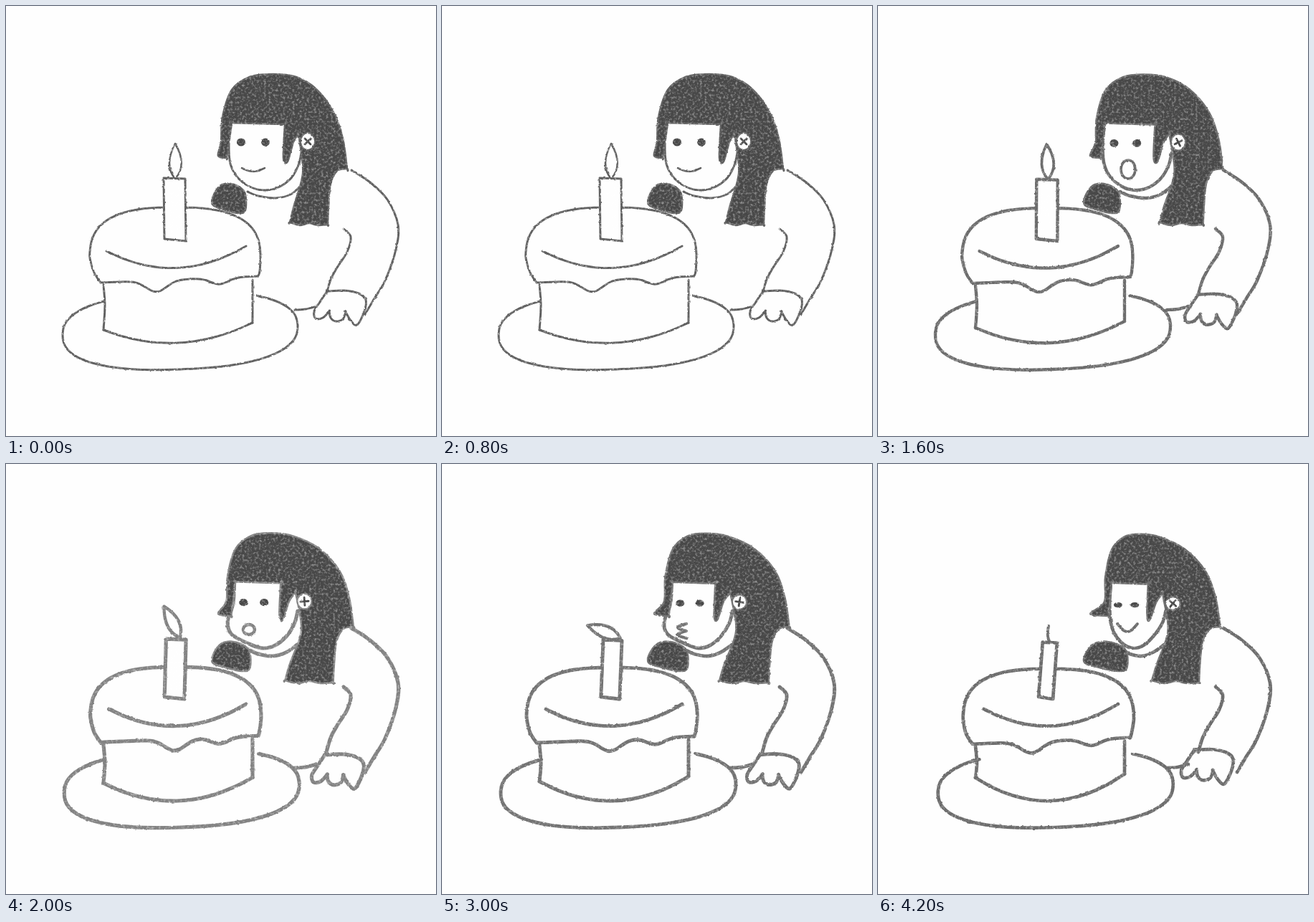
Write an HTML page that moves like this. It is 600 by 600 pixels and loops after 4600 ms.

```html
<!DOCTYPE html>
<html lang="en">
<head>
<meta charset="utf-8">
<title>Birthday candle</title>
<style>
html, body { margin: 0; width: 100%; height: 100%; overflow: hidden; background: #fefefe; }
svg { display: block; width: 100vw; height: 100vh; }
path { stroke-linecap: round; stroke-linejoin: round; }
</style>
</head>
<body>
<svg viewBox="0 0 600 600">
  <defs>
    <filter id="pencil" x="0" y="0" width="600" height="600" filterUnits="userSpaceOnUse" color-interpolation-filters="sRGB">
      <feTurbulence id="edge" type="fractalNoise" baseFrequency=".2" numOctaves="2" result="warp"/>
      <feDisplacementMap in="SourceGraphic" in2="warp" scale="2.4" xChannelSelector="R" yChannelSelector="G" result="rough"/>
      <feTurbulence id="grain" type="fractalNoise" baseFrequency=".3" numOctaves="3"/>
      <feColorMatrix values="0 0 0 0 0  0 0 0 0 0  0 0 0 0 0  1.1 0 0 0 .42" result="tooth"/>
      <feComposite in="rough" in2="tooth" operator="in"/>
    </filter>
  </defs>
  <g id="art" filter="url(#pencil)"></g>
</svg>
<script>
const paper = '#fefefe', dark = '#484848';
const { PI, sin, cos, abs, sign, min, max } = Math;
const mix = (a, b, t) => a + (b - a) * t;
const bump = (x, size) => Math.exp(-((x / size) ** 2));
const sample = (n, f) => Array.from({ length: n + 1 }, (_, i) => f(i / n));

// Key points of the figure looking straight; * marks a corner.
const figure = {
  hair: '296,209 300,190 302,155 315,117 340,99 372,95 405,99 433,116 457,148 470,185 476,227* 462,230 453,248 450,280 449,305* 435,306 423,303 410,306 396,302* 402,278 412,245 414,222 408,178* 401,190 393,217 387,212 389,165* 350,164 315,163* 312,185 308,212*',
  lock: '302,249 318,249 333,260 334,285 324,289 304,284 288,277 291,261',
  face: '313,168 311,195 313,220 322,238 340,252 360,257 380,253 398,240 408,222 412,205',
  neck: '337,259 352,265 376,268 397,263 410,252',
  arm: '482,229 508,246 532,270 547,305 544,340 529,383 514,408 501,430',
  sleeve: '471,311 481,322 476,343 462,365 453,382 447,402',
  waist: '403,424 418,423 433,419',
  hand: '446,402 470,401 490,405 500,414 498,430 488,449 479,443 472,431* 468,441 458,444 451,439 449,430* 440,439 430,440 428,430 436,417 446,402'
};

// Mouth shapes: each returns a list of points around x, y.
const smile = (x, y, w, h) => sample(6, t => [x + w * (2 * t - 1), y + h * sin(PI * t)]);
const ring = (x, y, w, h) => sample(12, t => [x + w * cos(2 * PI * t), y + h * sin(2 * PI * t)]);
const pucker = (x, y) => sample(16, t => [x + 5 - 12 * abs(sin(2 * PI * t)), y + 10 * (2 * t - 1)]);

// turn: how far the head has turned; lean: flame angle in degrees.
const ready = { turn: 0, width: 3, ink: '#606060', lean: 0, mouth: smile(345, 226, 16, 5) };
const gasp = { turn: .2, width: 4.4, ink: '#6b6b6b', lean: -2, mouth: ring(349, 228, 10, 13) };
const puff = { turn: .45, width: 5.2, ink: '#828282', lean: -27, pout: .9, mouth: ring(339, 231, 8, 7) };
const blow = { turn: .6, width: 4.9, ink: '#727272', lean: -69, pout: 1, mouth: pucker(336, 233) };
const done = { turn: .75, width: 4.9, ink: '#747474', rise: 0, mouth: ring(345, 233, 2, 1.5) };
const happy = { turn: .95, width: 4.7, ink: '#6c6c6c', mouth: smile(348, 223, 14, 11) };

const vary = (pose, parts) => ({ ...pose, wobble: 1, ...parts });
const drawings = {
  A: ready,
  B: vary(ready, { lean: 4 }),
  C: vary(ready, { lean: -4 }),
  D: vary(gasp, { mouth: ring(349, 228, 7, 9) }),
  M: gasp,
  E: puff,
  F: vary(puff, { lean: -36 }),
  G: blow,
  H: vary(blow, { lean: -62 }),
  I: vary(done, { rise: -70 }),
  J: done,
  K: vary(done, { rise: 20 }),
  Z: happy
};
const order = 'ABCBADADMDEFEGHGHGIJKZZ';
const step = 200, loop = order.length * step;

function random(seed) {
  return () => (seed = seed * 16807 % 2147483647) / 2147483647;
}

function points(text, move = (x, y) => [x, y]) {
  return text.split(' ').flatMap(s => {
    const p = move(...s.replace('*', '').split(',').map(Number));
    return s.endsWith('*') ? [p, p] : [p];
  });
}

function curve(pts, closed) {
  const n = pts.length;
  const at = i => closed ? pts[(i + n) % n] : pts[max(0, min(n - 1, i))];
  let d = 'M' + pts[0];
  for (let i = 0; i < (closed ? n : n - 1); i++) {
    const [a, b, c, e] = [at(i - 1), at(i), at(i + 1), at(i + 2)];
    const leave = b.map((v, k) => v + (c[k] - a[k]) / 6);
    const reach = c.map((v, k) => v - (e[k] - b[k]) / 6);
    d += `C${leave} ${reach} ${c}`;
  }
  return d + (closed ? 'Z' : '');
}

// Part of a rounded ellipse between two angles in degrees.
function oval(x, y, rx, ry, from, to, n, tilt = 0) {
  const round = v => sign(v) * abs(v) ** (2 / n);
  return sample(28, t => {
    const a = mix(from, to, t) * PI / 180, dx = round(cos(a));
    return [x + rx * dx, y + ry * round(sin(a)) - tilt * dx];
  });
}

const sag = (x0, y0, x1, y1, depth) =>
  sample(8, t => [mix(x0, x1, t), mix(y0, y1, t) + depth * 4 * t * (1 - t)]);

function cake(u, sway) {
  const low = 5 * u, left = 452 - 15 * u, right = 442 - 10 * u;
  const drip = 210 + 26 * sway;
  const frosting = sample(24, t => {
    const x = mix(132, 352, t);
    return [x, mix(386, 377, t) + low + 16 * bump(x - drip, 20) + 9 * bump(x - 298, 17)];
  });
  const top = oval(236 + 2 * u, 352 + low, 119, 71, 180, 360, 2.7);
  return [
    oval(243 + 5 * u, 453, 164, 54, 233, -53, 2.4, 6),
    [[136, 389 + low], [138, 418], [136, left]],
    sag(136, left, 344, right, 470 - (left + right) / 2),
    [[344, right], [344, 410], [344, 382 + low]],
    [frosting[0], [123, 372 + low], ...top, [354, 370 + low], frosting[24]],
    frosting,
    sag(140 + 8 * u, 342, 335, 335, 27)
  ];
}

function candle(u) {
  const w = 15 - 5.5 * u * u, x = 235 + 5 * u, y = 240 + 9 * u, foot = 236 - 2 * u;
  return `M${x - w},${y}L${foot - w},325L${foot + w},328L${x + w},${y + 1}Z`;
}

function flame(u, lean) {
  const a = lean * PI / 180, x = 236 + 4 * u - 11 * sin(a), y = 241 + 3 * u;
  const at = (along, side) => [x + along * sin(a) + side * cos(a), y - along * cos(a) + side * sin(a)];
  return `M${at(0, 0)}C${at(14, -12)} ${at(32, -9)} ${at(49, 0)}C${at(32, 10)} ${at(14, 13)} ${at(0, 0)}`;
}

// Each wisp is a sine line that rises out of the wick.
function smoke(rise) {
  const wisp = (x0, y0, x1, y1, swing, turns) =>
    sample(16, t => [mix(x0, x1, t) - swing * sin(2 * PI * turns * t), mix(y0, y1, t) - rise])
      .filter(p => p[1] < 233);
  return [
    wisp(243, 83, 253, 179, 9, 1),
    wisp(221, 135, 222, 214, 7, 1),
    wisp(247, 204, 250, 232, -5, .5)
  ].filter(w => w.length > 1);
}

function render(key) {
  const { turn: u, width, ink, lean, rise, mouth, pout = 0, wobble = 0 } = drawings[key];
  const rnd = random(key.charCodeAt(0) * 977), sway = sin(PI * u);
  const shake = pts => pts.map(p => p.map(v => v + (rnd() - .5) * wobble));
  const path = (d, w = width, fill = 'none', color = ink) =>
    `<path d="${d}" fill="${fill}" stroke="${color}" stroke-width="${w}"/>`;
  const line = (pts, w) => path(curve(shake(pts)), w);
  const patch = pts => path(curve(shake(pts), true), 2.5, dark);

  // The head narrows as it turns; the hair behind it swings out.
  const turnX = x => x < 300 ? x
    : x - .33 * u * (min(x, 395) - 350) * max(0, min(1, (460 - x) / 65));
  const head = (x, y) => [turnX(x) + 9 * sway * max(0, min(1, (x - 400) / 50)), y + 3 * u * (y < 200)];
  const cheek = (x, y) => [turnX(x) - pout * 17 * bump(y - 230, 14) * (x < 330), y];
  const spread = (x, y) => [288 + (x - 288) * (1 + .3 * u), y];
  const rest = (x, y) => [x + 2 - 7 * u, y - 4 + 8 * sway];

  const eye = x => `<ellipse cx="${turnX(x)}" cy="${190 + 7 * u}" rx="6" ry="${5.5 - 2 * u * u}" fill="${dark}"/>`;
  const ear = `<g transform="translate(${421 - 10 * u} ${189 + 6 * u})">
    <ellipse rx="10" ry="${12 - 3 * u}" fill="${paper}" stroke="${ink}" stroke-width="2"/>
    <path d="M-4,-4L4,4M4,-4L-4,4" transform="rotate(${90 * u})" stroke="${dark}" stroke-width="2.8"/></g>`;
  const fire = lean === undefined ? 'M239,247Q235,240 238,226' : flame(u, lean);

  return cake(u, sway).map(p => line(p)).join('')
    + path(candle(u), width, paper) + path(fire, width * .85)
    + (rise === undefined ? '' : smoke(rise).map(p => line(p)).join(''))
    + line(points(figure.face, cheek)) + line(points(figure.neck, head))
    + ['arm', 'sleeve', 'waist'].map(k => line(points(figure[k]))).join('')
    + line(points(figure.hand, rest))
    + patch(points(figure.hair, head)) + patch(points(figure.lock, spread))
    + ear + eye(328) + eye(362) + line(mouth, width * .85);
}

const art = document.getElementById('art');
const noises = ['edge', 'grain'].map(id => document.getElementById(id));
let shown = '';

function show(ms) {
  const key = order[Math.floor(ms % loop / step)];
  if (key === shown) return;
  shown = key;
  noises.forEach(n => n.setAttribute('seed', key.charCodeAt(0)));
  art.innerHTML = render(key);
}

const start = performance.now();
function tick() {
  show(performance.now() - start);
  requestAnimationFrame(tick);
}
tick();
</script>
</body>
</html>
```
